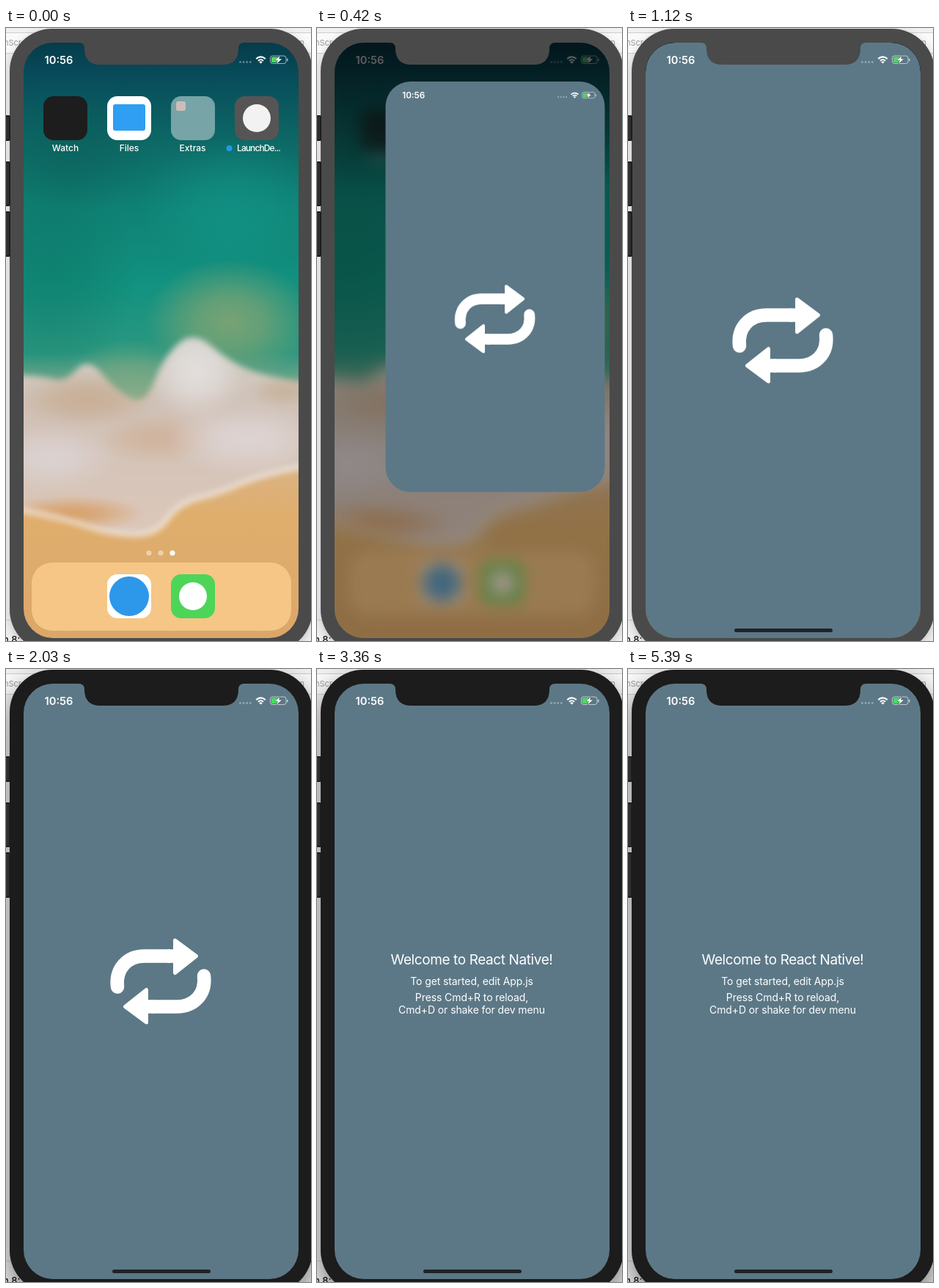
An HTML page with a canvas for the animation above (5460 ms loop, 416 by 836 pixels).

```html
<!DOCTYPE html>
<html lang="en">
<head>
<meta charset="utf-8">
<title>Splash screen</title>
<style>
html, body { margin: 0; width: 100%; height: 100%; overflow: hidden; background: #f1f1f1; }
canvas { display: block; width: 416px; height: 836px; }
</style>
</head>
<body>
<canvas id="stage" width="416" height="836"></canvas>
<script>
const W = 416, H = 836, LOOP = 5460, STEP = 70;
const SCREEN = { x: 24, y: 20, w: 375, h: 812, r: 40 };
const BLUE = '#5c7886';
const FONT = 'Inter, "Liberation Sans", sans-serif';
const ctx = document.getElementById('stage').getContext('2d');

const clamp = v => Math.max(0, Math.min(1, v));
const mix = (a, b, k) => a + (b - a) * k;
const ramp = (t, from, to) => clamp((t - from) / (to - from));
const ease = k => k * k * (3 - 2 * k);

// Critically damped spring from 0 to 1
function spring(t, start) {
  const k = Math.max(0, t - start) * 0.0149;
  return 1 - (1 + k) * Math.exp(-k);
}

function box(c, x, y, w, h, r, fill) {
  c.beginPath();
  c.roundRect(x, y, w, h, r);
  if (fill) {
    c.fillStyle = fill;
    c.fill();
  }
}

function disc(c, x, y, r, fill) {
  c.beginPath();
  c.arc(x, y, r, 0, Math.PI * 2);
  c.fillStyle = fill;
  c.fill();
}

function text(c, str, x, y, size, { weight = 400, align = 'center', color = '#fff', gap = 0 } = {}) {
  c.font = `${weight} ${size}px ${FONT}`;
  c.textAlign = align;
  c.letterSpacing = gap + 'px';
  c.fillStyle = color;
  c.fillText(str, x, y);
}

function layer(draw) {
  const el = document.createElement('canvas');
  el.width = W;
  el.height = H;
  draw(el.getContext('2d'));
  return el;
}

function gradient(c, y0, y1, stops) {
  const g = c.createLinearGradient(0, y0, 0, y1);
  for (const [at, color] of stops) g.addColorStop(at, color);
  return g;
}

// Smooth curve through the points
function curve(c, pts) {
  for (let i = 1; i < pts.length - 1; i++) {
    const [x, y] = pts[i], [nx, ny] = pts[i + 1];
    c.quadraticCurveTo(x, y, (x + nx) / 2, (y + ny) / 2);
  }
  c.lineTo(...pts[pts.length - 1]);
}

function glow(c, x, y, rx, ry, rgb, alpha) {
  c.save();
  c.translate(x, y);
  c.scale(rx, ry);
  const g = c.createRadialGradient(0, 0, 0, 0, 0, 1);
  g.addColorStop(0, `rgba(${rgb},${alpha})`);
  g.addColorStop(0.4, `rgba(${rgb},${alpha * 0.75})`);
  g.addColorStop(1, `rgba(${rgb},0)`);
  disc(c, 0, 0, 1, g);
  c.restore();
}

const foam = layer(c => {
  const top = [[-20, 472], [50, 474], [80, 484], [112, 448], [150, 495], [190, 515],
    [214, 450], [255, 412], [305, 455], [350, 474], [436, 488]];
  const edge = [[436, 592], [350, 608], [290, 635], [235, 648], [205, 692], [140, 690],
    [85, 670], [-20, 650]];
  c.beginPath();
  c.moveTo(...top[0]);
  curve(c, top);
  c.lineTo(...edge[0]);
  curve(c, edge);
  c.closePath();
  c.fillStyle = gradient(c, 410, 690, [[0, '#d0d0c8'], [0.4, '#d0c1b7'], [1, '#dcc8ba']]);
  c.fill();
  c.save();
  c.clip();
  glow(c, 110, 505, 100, 40, '195,160,125', 0.6);
  glow(c, 260, 470, 65, 65, '236,234,236', 0.65);
  glow(c, 60, 585, 90, 45, '222,216,220', 0.7);
  glow(c, 205, 560, 80, 35, '205,165,130', 0.5);
  glow(c, 330, 560, 110, 50, '226,219,222', 0.7);
  glow(c, 90, 662, 100, 24, '215,155,95', 0.9);
  glow(c, 380, 495, 50, 22, '195,165,135', 0.6);
  c.restore();
  c.beginPath();
  c.moveTo(...edge[0]);
  curve(c, edge);
  c.strokeStyle = '#f1ebe7';
  c.lineWidth = 5;
  c.stroke();
});

const wallpaper = layer(c => {
  c.fillStyle = gradient(c, 0, H, [
    [0, '#053545'], [0.08, '#084c5b'], [0.19, '#0d6a66'], [0.3, '#0f8275'],
    [0.42, '#129280'], [0.53, '#2b977f'], [0.59, '#86aa8c'], [0.68, '#d9b48b'],
    [0.8, '#dfae6d'], [1, '#dba769']
  ]);
  c.fillRect(0, 0, W, H);
  glow(c, 60, 330, 120, 150, '10,105,90', 0.35);
  glow(c, 90, 170, 110, 80, '10,85,80', 0.35);
  glow(c, 310, 240, 130, 90, '20,165,150', 0.4);
  glow(c, 305, 400, 115, 85, '135,165,115', 0.85);
  glow(c, 170, 475, 90, 50, '130,170,130', 0.6);
  c.filter = 'blur(4px)';
  c.drawImage(foam, 0, 0);
  c.filter = 'none';
});

const icons = layer(c => {
  const tile = (x, y, fill) => box(c, x, y, 60, 60, 14, fill);
  const label = (str, x) => text(c, str, x, 168, 12, { weight: 500 });
  tile(51, 93, '#1d1d1e');
  label('Watch', 81);
  tile(138, 93, '#fff');
  box(c, 146, 104, 44, 36, 3, '#2e9ff2');
  label('Files', 168);
  tile(225, 93, '#76a4a7');
  box(c, 232, 100, 13, 13, 3, '#cbbdb9');
  label('Extras', 254.5);
  tile(312, 93, '#575455');
  disc(c, 342, 123, 19, '#f2f2f2');
  disc(c, 304.5, 164, 4, '#1d9bea');
  text(c, 'LaunchDe...', 315, 168, 12, { weight: 500, align: 'left', gap: -0.9 });

  for (let i = 0; i < 3; i++) {
    disc(c, 195 + i * 16, 716, 3.6, i === 2 ? '#fff' : 'rgba(255,255,255,.45)');
  }
  box(c, 35, 729, 354, 93, 28, '#f5c686');
  tile(138, 745, '#fff');
  disc(c, 168, 775, 27, '#2d97ea');
  tile(225, 745, '#4cd559');
  disc(c, 255, 775, 19, '#fff');
});

function statusBar(c) {
  text(c, '10:56', 52.5, 48.5, 14.7, { weight: 600, align: 'left' });
  for (let i = 0; i < 4; i++) disc(c, 319.5 + i * 4.6, 46.5, 1.4, 'rgba(255,255,255,.35)');

  // Wi-Fi fan
  c.strokeStyle = '#fff';
  c.lineWidth = 2.1;
  for (const r of [4.8, 8.6]) {
    c.beginPath();
    c.arc(347.5, 48, r, -Math.PI * 0.76, -Math.PI * 0.24);
    c.stroke();
  }
  c.beginPath();
  c.moveTo(347.5, 48.5);
  c.arc(347.5, 48.5, 3.1, -Math.PI * 0.76, -Math.PI * 0.24);
  c.fillStyle = '#fff';
  c.fill();

  // Charging battery
  box(c, 360.5, 38, 21.5, 10.5, 3);
  c.strokeStyle = 'rgba(255,255,255,.6)';
  c.lineWidth = 1;
  c.stroke();
  box(c, 383, 41.5, 1.5, 4, 1, 'rgba(255,255,255,.6)');
  box(c, 362, 39.5, 9.5, 7.5, 1.5, '#4cd964');
  c.beginPath();
  c.moveTo(373.5, 38);
  c.lineTo(367, 44);
  c.lineTo(370.8, 44);
  c.lineTo(369.3, 48.6);
  c.lineTo(376, 42.3);
  c.lineTo(372.2, 42.3);
  c.closePath();
  c.strokeStyle = '#3a4d50';
  c.stroke();
  c.fillStyle = '#fff';
  c.fill();
}

// One arrow, then the same turned half round
const arrows = layer(c => {
  c.fillStyle = c.strokeStyle = '#fff';
  c.lineJoin = c.lineCap = 'round';
  for (let i = 0; i < 2; i++) {
    c.lineWidth = 18.5;
    c.beginPath();
    c.moveTo(152, 433.5);
    c.bezierCurveTo(149, 408, 166, 391.5, 189, 391.5);
    c.lineTo(222, 391.5);
    c.stroke();
    c.fillRect(220, 382.3, 14, 18.5);
    c.lineWidth = 5;
    c.beginPath();
    c.moveTo(230.5, 370);
    c.lineTo(259.5, 391.5);
    c.lineTo(230.5, 414.5);
    c.closePath();
    c.fill();
    c.stroke();
    c.translate(422, 852);
    c.rotate(Math.PI);
  }
});

function welcome(c) {
  text(c, 'Welcome to React Native!', 211, 403, 19, { gap: -0.4 });
  const lines = [['To get started, edit App.js', 431], ['Press Cmd+R to reload,', 453],
    ['Cmd+D or shake for dev menu', 470]];
  for (const [str, y] of lines) text(c, str, 211, y, 14, { gap: -0.1 });
}

function app(c, t, grown) {
  c.fillStyle = BLUE;
  c.fillRect(0, 0, W, H);
  const left = 1 - ease(ramp(t, 2590, 2850));
  const alpha = c.globalAlpha;
  if (left < 1) {
    c.globalAlpha = alpha * (1 - left);
    welcome(c);
  }
  if (left > 0) {
    c.globalAlpha = alpha * left;
    c.drawImage(arrows, 0, 0);
  }
  c.globalAlpha = alpha * ramp(grown, 0.85, 0.98);
  box(c, 145, 819, 134, 5, 2.5, '#202326');
  c.globalAlpha = alpha;
  statusBar(c);
  if (t >= 2450 && t < 3220) {
    const y = 20 - 24 * ease(ramp(t, 2950, 3220));
    c.fillStyle = '#086a0d';
    c.fillRect(0, y, W, 22);
    text(c, 'Downloading JavaScript bundle 100% (2106/2106)...', 211, y + 15.5, 12, { gap: -0.1 });
  }
}

function home(c, p) {
  if (p > 0.01) c.filter = `blur(${13 * p}px)`;
  const bleed = 30 * p;
  c.drawImage(wallpaper, -bleed, -bleed, W + 2 * bleed, H + 2 * bleed);
  c.save();
  const s = 1 - 0.07 * p;
  c.globalAlpha = 1 - 0.45 * p;
  c.translate(211, 426);
  c.scale(s, s);
  c.drawImage(icons, -211, -426);
  c.restore();
  c.filter = 'none';
  statusBar(c);
  c.fillStyle = `rgba(0,0,0,${0.46 * p})`;
  c.fillRect(0, 0, W, H);
  c.fillStyle = gradient(c, 20, 220, [[0, `rgba(0,0,0,${0.65 * p})`], [1, 'rgba(0,0,0,0)']]);
  c.fillRect(0, 0, W, 220);
}

function card(c, t, p) {
  const q = spring(t, 267);
  const w = mix(60, SCREEN.w, p), h = mix(60, SCREEN.h, q);
  const x = mix(342, 211.5, p) - w / 2, y = mix(123, 426, p) - h / 2;
  const s = w / SCREEN.w;
  c.save();
  c.globalAlpha = clamp(p / 0.25);
  box(c, x, y, w, h, mix(14, SCREEN.r, p));
  c.clip();
  c.translate(x, y);
  c.scale(s, s);
  c.translate(-SCREEN.x, -SCREEN.y);
  app(c, t, p);
  c.restore();
}

function desktop(c, active) {
  c.fillStyle = '#f1f1f1';
  c.fillRect(0, 0, W, H);
  c.fillStyle = '#fafafa';
  c.fillRect(0, 7, W, 27);
  c.fillStyle = '#cdcdcd';
  for (const y of [6, 34, 807]) c.fillRect(0, y, W, 1);
  text(c, 'nScr', -3, 24, 11, { align: 'left', color: '#999' });
  text(c, 'n', 407, 24, 11, { align: 'right', color: '#999' });
  text(c, 'n 8:', -4, 839, 13, { align: 'left', color: '#111', weight: 500 });
  c.save();
  c.shadowColor = `rgba(0,0,0,${active ? 0.5 : 0.2})`;
  c.shadowBlur = active ? 34 : 14;
  c.shadowOffsetY = active ? 14 : 4;
  box(c, 5, 1, 413, 850, 58, active ? '#1c1c1c' : '#4a4a4a');
  c.restore();
  for (const [y, h] of [[119, 35], [182, 61], [250, 62]]) {
    box(c, -3, y, 9, h, 2, '#1d1d1d');
    c.fillStyle = '#303030';
    c.fillRect(0, y + 2, 4, h - 4);
  }
}

function notch(c, color) {
  c.beginPath();
  c.moveTo(99, 19);
  c.lineTo(99, 20);
  c.quadraticCurveTo(107, 20, 107, 28);
  c.quadraticCurveTo(107, 50, 129, 50);
  c.lineTo(295, 50);
  c.quadraticCurveTo(317, 50, 317, 28);
  c.quadraticCurveTo(317, 20, 325, 20);
  c.lineTo(325, 19);
  c.closePath();
  c.fillStyle = color;
  c.fill();
}

function render(t) {
  const active = t >= 1330;
  const p = spring(t, 236);
  desktop(ctx, active);
  ctx.save();
  box(ctx, SCREEN.x, SCREEN.y, SCREEN.w, SCREEN.h, SCREEN.r);
  ctx.clip();
  if (t < 1190) {
    home(ctx, p);
    if (p > 0) card(ctx, t, p);
  } else {
    app(ctx, t, 1);
  }
  ctx.restore();
  notch(ctx, active ? '#1c1c1c' : '#4a4a4a');
}

const start = performance.now();
function tick() {
  const t = (performance.now() - start) % LOOP;
  render(Math.floor(t / STEP) * STEP);
  requestAnimationFrame(tick);
}
tick();
</script>
</body>
</html>
```
